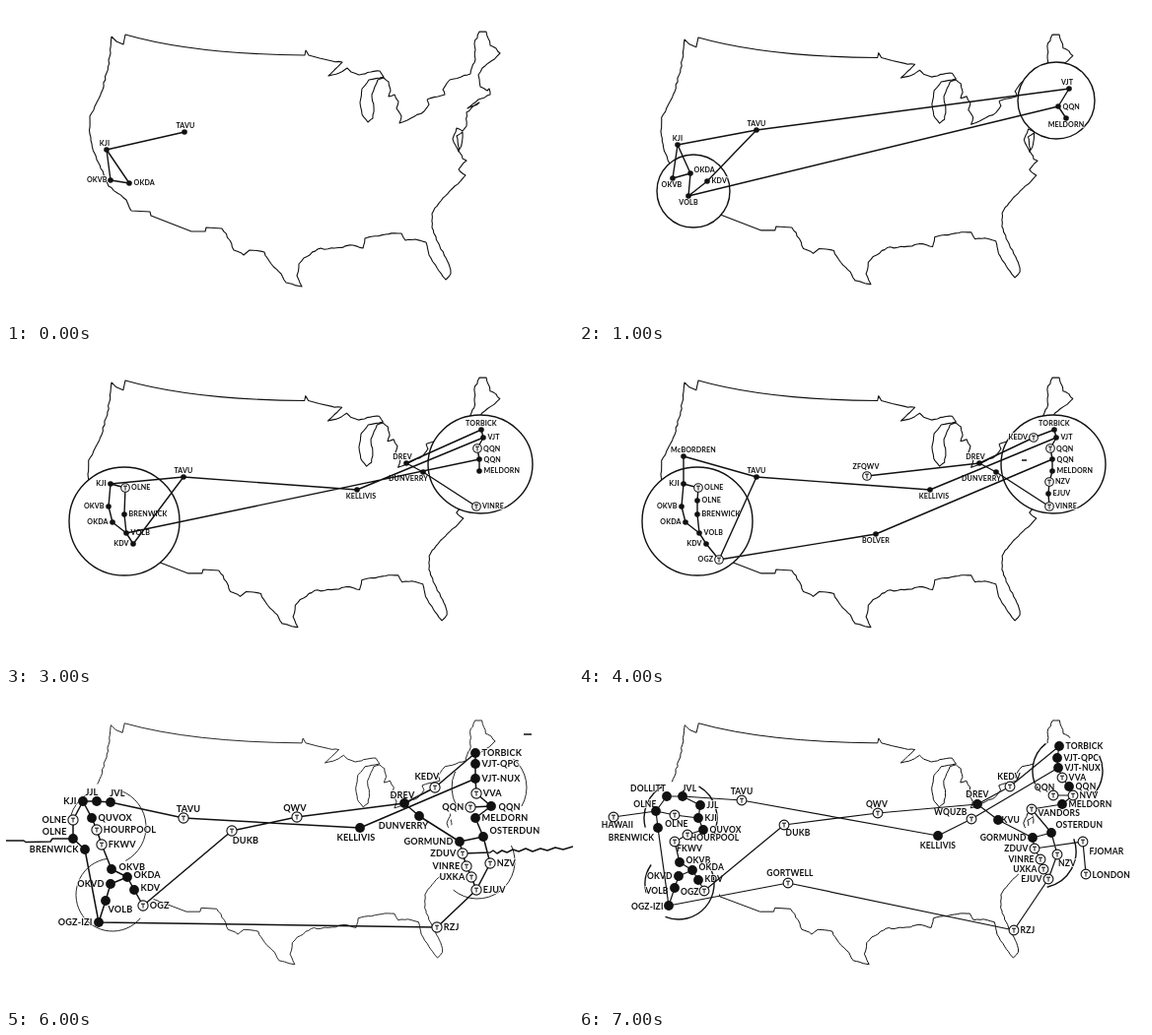
These frames come from a looping animation (575 by 320 pixels, 8000 ms). An HTML page:

```html
<!DOCTYPE html>
<html lang="en">
<head>
<meta charset="utf-8">
<title>Network growth map</title>
<style>
html, body { margin: 0; width: 100%; height: 100%; overflow: hidden; background: #fff; }
svg { display: block; width: 100vw; height: 100vh; }
text { font-family: Lato, "Liberation Sans", sans-serif; font-weight: 700; fill: #111;
  stroke: #fff; stroke-width: 1.4px; paint-order: stroke; }
path, ellipse { fill: none; stroke: #111; stroke-linejoin: round; }
.coast { vector-effect: non-scaling-stroke; }
.blank { fill: #fff; stroke: none; }
.open { fill: #fff; }
.dot { fill: #111; stroke: none; }
</style>
</head>
<body>
<svg id="stage" viewBox="0 0 575 320"></svg>
<script>
const STEP = 1000;

let seed = 7;
const noise = () => (seed = (seed * 16807) % 2147483647) / 2147483647 - 0.5;

// Turns a short list of points into a line with a hand-drawn wobble.
function shore(text, rough = 1.5) {
  const pts = text.trim().split(/\s+/).map(p => p.split(",").map(Number));
  let d = "M" + pts[0];
  for (let i = 1; i < pts.length; i++) {
    const [x0, y0] = pts[i - 1], [x1, y1] = pts[i];
    const n = rough ? Math.max(1, Math.round(Math.hypot(x1 - x0, y1 - y0) / 3.5)) : 1;
    for (let k = 1; k <= n; k++) {
      const j = k < n ? rough : 0;
      d += `L${(x0 + (x1 - x0) * k / n + noise() * j).toFixed(1)},${(y0 + (y1 - y0) * k / n + noise() * j).toFixed(1)}`;
    }
  }
  return d;
}

const northBorder = "M107,31L112,36L119,39L121,29Q190,49 303,50L304,45L307,50L318,53L331,56";
const lakes = shore(`331,56 341,57 334,64 327,71 338,68 346,63 350,67 358,70 370,67 379,66 383,72
  379,73 368,75 361,84 359,98 361,110 367,118 372,114 373,103 371,90 374,82 377,75 383,73
  388,77 390,86 388,92 394,90 398,97 396,104 401,112 399,119 407,116 424,107 429,100 427,95`, 1);
const northEast = shore(`427,95 445,90 443,85 450,75 471,69 476,54 475,38 480,26 487,26 491,40 497,43
  501,48 492,56 483,63 479,70 481,82 488,86 490,84 491,90 479,95 468,104 480,98 467,108 467,122 463,127`, 1.2);
const southEast = shore(`463,127 457,124 453,135 459,148 457,132 463,128 462,141 459,147 463,155 467,157
  459,166 466,172 455,183 441,198 432,211 432,225 438,240 449,262 451,272 446,278 439,269 429,253 426,240`);
const gulf = shore(`426,240 415,237 405,238 401,231 385,232 364,236 362,246 352,243 333,246 316,247
  302,256 297,262 295,274 300,285 284,281 279,272 269,262 262,250 247,248 241,253 231,248 227,238 219,226`);
const southBorder = shore("219,226 203,225 202,229 188,229 147,213 146,209 127,208", 0);
const west = shore(`127,208 122,197 113,190 104,183 101,176 96,165 90,150 87,140 85,130 85,112
  92,98 98,85 102,68 106,48 107,31`);
const coast = northBorder + lakes + northEast + southEast + gulf + southBorder + west;

// Node: id x y side [dx dy]; a capital side letter marks an open terminal,
// ".2" tells apart nodes with equal labels. Links are chains of ids or points.
const SIDES = "rltbRLTB";
const early = { map: "1 0 -.016 .98 .5 3.5", size: 7.1, dot: 2.8, ring: 4.3, coast: 1.1, link: 1.4 };
const late = { map: "1 0 -.024 .957 1 4", size: 8.5, dot: 4.9, ring: 4.9, coast: 1, link: 1.2 };

const scenes = [
  { ...early, map: "1 0 0 1 0 0",
    nodes: `KJI 102 146 t -2 0;TAVU 181 128 t 1 0;OKVB 106 177 l 1 0;OKDA 125 180 r`,
    links: `TAVU>KJI>OKVB>OKDA>KJI` },

  { ...early,
    rings: [[116, 188, 37, 37], [484, 96, 39, 39]],
    nodes: `KJI 100 141 t;OKDA 113 170 r -1 -3;OKVB 95 175 b -1 0;KDV 130 178 r;VOLB 111 193 b;
      TAVU 180 126 t;VJT 497 84 t -2 0;QQN 486 102 r 0 1;MELDORN 494 114 b`,
    links: `KJI>TAVU>VJT>QQN>MELDORN KJI>OKDA KJI>OKVB>OKDA>VOLB>KDV>TAVU VOLB>QQN` },

  { ...early,
    rings: [[116, 188, 37, 37], [484, 96, 39, 39]],
    nodes: `KJI 100 141 t;BRENWICK 114 148 r 0 -1;OKDA 113 170 r -1 -3;OKVB 95 175 b -1 0;
      KDV 130 178 r;VOLB 111 193 b;TAVU 180 126 t -1 0;DREV 406 115 t -3 -1;DUNVERRY 411 132 b 2 0;
      TORBICK 477 78 t -6 0;VJT 497 84 t -2 0;QQN 486 102 r 0 1;MELDORN 494 114 b`,
    links: `KJI>TAVU>VJT KJI>BRENWICK>OKDA KJI>OKDA KJI>OKVB>OKDA>VOLB>KDV>TAVU VOLB>QQN
      DREV>TORBICK>VJT>QQN>MELDORN>DUNVERRY>DREV` },

  { ...early,
    rings: [[120, 175, 56, 55], [481, 117, 53, 50]],
    nodes: `KJI 106 137 l;OLNE 121 141 R;BRENWICK 120 168 r;OKVB 104 160 l;OKDA 108 176 l;
      VOLB 122 187 r;KDV 129 198 l;TAVU 180 130 t;KELLIVIS 356 143 b 4 0;DREV 406 116 t -4 0;
      DUNVERRY 423 125 b -15 0;TORBICK 482 82 t;VJT 484 90 r;QQN.2 478 101 R 0 1;QQN 480 112 r 0 1;
      MELDORN 480 124 r;VINRE 477 160 R`,
    links: `KJI>TAVU>KELLIVIS>VJT KJI>OLNE>BRENWICK>VOLB KJI>OKVB>OKDA>VOLB>KDV>TAVU VOLB>QQN
      DREV>TORBICK>VJT>QQN.2>QQN>MELDORN DREV>DUNVERRY>VINRE` },

  { ...early,
    rings: [[120, 175, 56, 55], [481, 117, 53, 50]],
    nodes: `McBORDREN 106 109 t 10 0;KJI 106 137 l;OLNE 121 141 R;OLNE.2 120 154 r;BRENWICK 120 168 r;
      OKVB 104 160 l;OKDA 108 176 l;VOLB 122 187 r;KDV 129 198 l;OGZ 142 214 L;TAVU 180 130 t;
      ZFQWV 292 129 T -1 -1;KELLIVIS 356 143 b 4 0;DREV 406 116 t -4 0;DUNVERRY 423 125 b -15 0;
      TORBICK 482 82 t;KEDV 461 90 L;VJT 484 90 r;QQN.2 478 101 R 0 1;QQN 480 112 r 0 1;
      MELDORN 480 124 r;NZV 477 135 R;EJUV 476 147 r;VINRE 477 160 R;BOLVER 301 188 b`,
    links: `KJI>McBORDREN>TAVU KJI>OLNE>OLNE.2>BRENWICK>VOLB KJI>OKVB>OKDA>VOLB>KDV>OGZ>TAVU
      TAVU>KELLIVIS>VJT ZFQWV>DREV>KEDV>TORBICK DREV>DUNVERRY>VINRE OGZ>BOLVER>QQN
      TORBICK>VJT>QQN.2>QQN>MELDORN>NZV>EJUV>VINRE 449,113>454,113` },

  { ...early, size: 6.9,
    rings: [[111, 137.5, 39.5, 39], [101, 208, 34, 33], [495.5, 105, 37.5, 36], [463.5, 176.5, 43.5, 42]],
    nodes: `McBORDREN 95 131 t 9 2;KJI 81 143 t -1 -1;OLNE 95 142 R;OLNE.2 97 155 r;BRENWICK 97 166 r;
      OKVB 97 189 l;OKDA 97 202 l;KDV 97 215 b;VOLB 121 202 t 7 0;OGZ 123 214 B;TAVU 180 128 t;
      NUEE 229 141 B 3 0;ZFQWV 296 130 T -1 -1;KELLIVIS 361 139 b 1 0;BOLVER 291 185 t;
      DREV 406 115 t -5 0;DUNVERRY 424 125 b -14 0;KEDV 444 90 T -1 0;TORBICK 478 82 r;VJT 478 94 r;
      QQN.2 479 106 R;QQN 480 117 r;MELDORN 480 130 r -1 0;GORMUND 463 152 l;ZUOV 467 161 L;
      VINRE 470 174 L;UXKA 474 185 L;EJUV 478 197 R 0 -1;NZV 493 159 L`,
    links: `KJI>McBORDREN>TAVU>KELLIVIS>VJT KJI>OLNE>OLNE.2>BRENWICK>VOLB KJI>OKVB>OKDA>KDV>OGZ
      OKDA>VOLB>BOLVER>EJUV OGZ>NUEE>ZFQWV>DREV>KEDV>TORBICK
      DREV>DUNVERRY>GORMUND>ZUOV>VINRE>UXKA>EJUV>NZV>MELDORN TORBICK>VJT>QQN.2>QQN>MELDORN` },

  { ...late, map: ".99 0 -.018 .957 1 4", size: 9.1, ring: 5.1, coast: 0.9, link: 1.5,
    blanks: [[100, 165, 64, 72], [486, 113, 36, 52], [472, 165, 36, 36]],
    arcs: [[103, 137, 39, 195, 242], [103, 137, 39, 290, 422], [108, 206, 37, 40, 262],
      [490, 97, 38, -50, 30], [490, 97, 38, 150, 205], [478, 172, 38, -25, 130]], arcWidth: 0.9,
    nodes: `KJI 78 111 l;JJL 92 111 t -5 0;JVL 106 112 t 7 0;QUVOX 87 128 r;HOURPOOL 92 140 R;FKWV 97 155 R;
      OLNE 68 130 L;OLNE.2 68 149 l 0 -7;BRENWICK 80 160 l;OKVB 107 180 r 1 -2;OKDA 123 188 r 0 -2;
      OKVD 106 195 l;KDV 130 201 r 0 -2;VOLB 101 212 b 15 -1;OGZ 139 217 R;OGZ-IZI 94 234 l;
      TAVU 180 128 T 5 0;DUKB 229 141 B 14 0;QWV 295 127 T -2 0;KELLIVIS 359 138 b -4 0;DREV 404 113 t -2 1;
      DUNVERRY 419 126 b -16 0;KEDV 435 97 T -8 -2;TORBICK 476 62 r;VJT-QPC 476 73 r;VJT-NUX 476 88 r;
      VVA 477 103 R;QQN.2 471 117 L;QQN 492 116 r 1 1;MELDORN 476 128 r;GORMUND 460 152 l;
      OSTERDUN 484 147 r 0 -6;ZDUV 463 164 L;VINRE 467 177 L;UXKA 472 188 L;EJUV 477 201 R;
      NZV 491 174 R;RZJ 437 239 R`,
    links: `KJI>JJL>JVL>TAVU>KELLIVIS>VJT-NUX KJI>OLNE>OLNE.2>BRENWICK>OGZ-IZI
      KJI>QUVOX>HOURPOOL>FKWV>OKVB>OKDA>KDV>OGZ>DUKB>QWV>DREV>KEDV>TORBICK
      OKDA>OKVD>VOLB>OGZ-IZI>RZJ>EJUV DREV>DUNVERRY>GORMUND>OSTERDUN>NZV>EJUV>UXKA>VINRE>ZDUV>GORMUND
      TORBICK>VJT-QPC>VJT-NUX>VVA>QQN>QQN.2 QQN>MELDORN>OSTERDUN 525,43>533,43
      0,151>18,151>20,152.5>45,152>47,149>OLNE.2
      ZDUV>491,163>494,161>498,164>503,161>508,163>514,160>520,162>527,159>534,162>542,159>549,161>557,158>565,160>575,157` },

  { ...late,
    blanks: [[100, 158, 60, 67], [492, 100, 36, 54], [474, 165, 35, 34]],
    arcs: [[103, 128, 37, 165, 243], [103, 128, 37, 300, 388], [101, 195, 36, -30, 112], [101, 195, 34, 165, 215],
      [495, 80, 35, 145, 232], [495, 80, 36, -25, 42], [467, 162, 37, -20, 78]], arcWidth: 1.4,
    nodes: `DOLLITT 89 106 t -19 1;JVL 105 106 t 7 1;OLNE.2 78 121 l 7 -7;HAWAII 35 127 B 4 -1;
      OLNE 97 125 B 2 0;BRENWICK 80 138 b -27 1;JJL 123 115 r;KJI 121 128 r;QUVOX 126 140 r;
      HOURPOOL 110 145 R -4 3;FKWV 97 152 B 15 -2;OKVB 102 173 r 0 -2;OKDA 115 181 r 0 -3;
      OKVD 101 187 l;KDV 121 191 r 0 -1;VOLB 97 199 l 0 3;OGZ 127 202 L 1 1;OGZ-IZI 91 217 l 1 1;
      TAVU 165 110 T 0 0;DUKB 208 135 B 14 -1;GORTWELL 212 194 T 2 -1;QWV 303 123 T -1 0;
      KELLIVIS 364 146 b 0 1;DREV 404 114 t 0 -1;WQUZB 398 129 L 2 -7;KVU 425 130 r -3 0;
      KEDV 437 96 T -1 -1;TORBICK 487 55 r;VJT-QPC 485 67 r;VJT-NUX 486 77 r;VVA 490 87 R;
      QQN 497 96 r;QQN.2 481 105 T -9 1;NVV 501 105 R;MELDORN 490 114 r;VANDORS 459 119 R 0 4;
      GORMUND 460 148 l;OSTERDUN 479 143 r -2 -8;ZDUV 462 159 L;VINRE 468 170 L;UXKA 471 180 L;
      EJUV 476 190 L;NZV 485 165 B 10 0;FJOMAR 511 152 B 24 1;LONDON 514 185 R 0 1;RZJ 441 242 R`,
    links: `HAWAII>OLNE.2>DOLLITT>JVL>TAVU>KELLIVIS>WQUZB>VJT-NUX OLNE.2>OLNE>KJI OLNE.2>BRENWICK>OGZ-IZI
      JVL>JJL>KJI>QUVOX>HOURPOOL>FKWV>OKVB>OKDA>KDV>OGZ>DUKB>QWV>DREV>KVU>GORMUND>OSTERDUN
      OKDA>OKVD>VOLB>OGZ-IZI>GORTWELL>RZJ>EJUV>UXKA>VINRE>ZDUV>GORMUND DREV>KEDV>TORBICK
      OSTERDUN>VANDORS>MELDORN>NVV>QQN.2 OSTERDUN>NZV>EJUV ZDUV>FJOMAR>LONDON
      TORBICK>VJT-QPC>VJT-NUX>VVA>QQN>NVV` }
];

const ellipse = ([x, y, rx, ry], extra) => `<ellipse cx="${x}" cy="${y}" rx="${rx}" ry="${ry}" ${extra}/>`;
const line = (d, width, extra = "") => `<path d="${d}" stroke-width="${width}" ${extra}/>`;

function arc([x, y, r, from, to]) {
  const at = a => [x + r * Math.cos(a * Math.PI / 180), y + r * Math.sin(a * Math.PI / 180)];
  return `M${at(from)}A${r},${r} 0 ${to - from > 180 ? 1 : 0} 1 ${at(to)}`;
}

function parseNode(row) {
  const [id, x, y, side, dx = 0, dy = 0] = row.trim().split(/\s+/);
  const i = SIDES.indexOf(side);
  return { id, x: +x, y: +y, dx: +dx, dy: +dy, side: i % 4, open: i > 3 };
}

function label(n, s) {
  const r = n.open ? s.ring : s.dot, mid = s.size * 0.35;
  const [ox, oy, anchor] = [
    [r + 1.7, mid, "start"],
    [-r - 1.5, mid, "end"],
    [0, -r - 1.4, "middle"],
    [0, r + s.size * 0.72 + 1.2, "middle"]
  ][n.side];
  return `<text x="${n.x + n.dx + ox}" y="${n.y + n.dy + oy}" font-size="${s.size}" letter-spacing=".15" text-anchor="${anchor}">${n.id.split(".")[0]}</text>`;
}

function mark(n, s) {
  if (!n.open) return ellipse([n.x, n.y, s.dot, s.dot], 'class="dot"');
  return ellipse([n.x, n.y, s.ring, s.ring], 'class="open" stroke-width="1.1"') +
    line(`M${n.x - 2},${n.y - 1.8}h4M${n.x},${n.y - 1.8}v4.4`, 1);
}

function draw(s) {
  const nodes = s.nodes.split(";").map(parseNode);
  const spots = Object.fromEntries(nodes.map(n => [n.id, `${n.x},${n.y}`]));
  const wires = s.links.trim().split(/\s+/)
    .map(chain => "M" + chain.split(">").map(p => spots[p] || p).join("L")).join("");
  return "<g display='none'>" +
    line(coast, s.coast, `class="coast" transform="matrix(${s.map})"`) +
    (s.blanks || []).map(b => ellipse(b, 'class="blank"')).join("") +
    (s.rings || []).map(b => ellipse(b, 'class="open" stroke-width="1.4"')).join("") +
    (s.arcs ? line(s.arcs.map(arc).join(""), s.arcWidth) : "") +
    nodes.map(n => label(n, s)).join("") +
    line(wires, s.link) +
    nodes.map(n => mark(n, s)).join("") + "</g>";
}

const stage = document.getElementById("stage");
stage.innerHTML = scenes.map(draw).join("");
const layers = [...stage.children];

function show(time) {
  const now = Math.floor(time / STEP) % layers.length;
  layers.forEach((g, i) => g.setAttribute("display", i === now ? "inline" : "none"));
}

const start = performance.now();
function tick() {
  show(performance.now() - start);
  requestAnimationFrame(tick);
}
tick();
</script>
</body>
</html>
```
